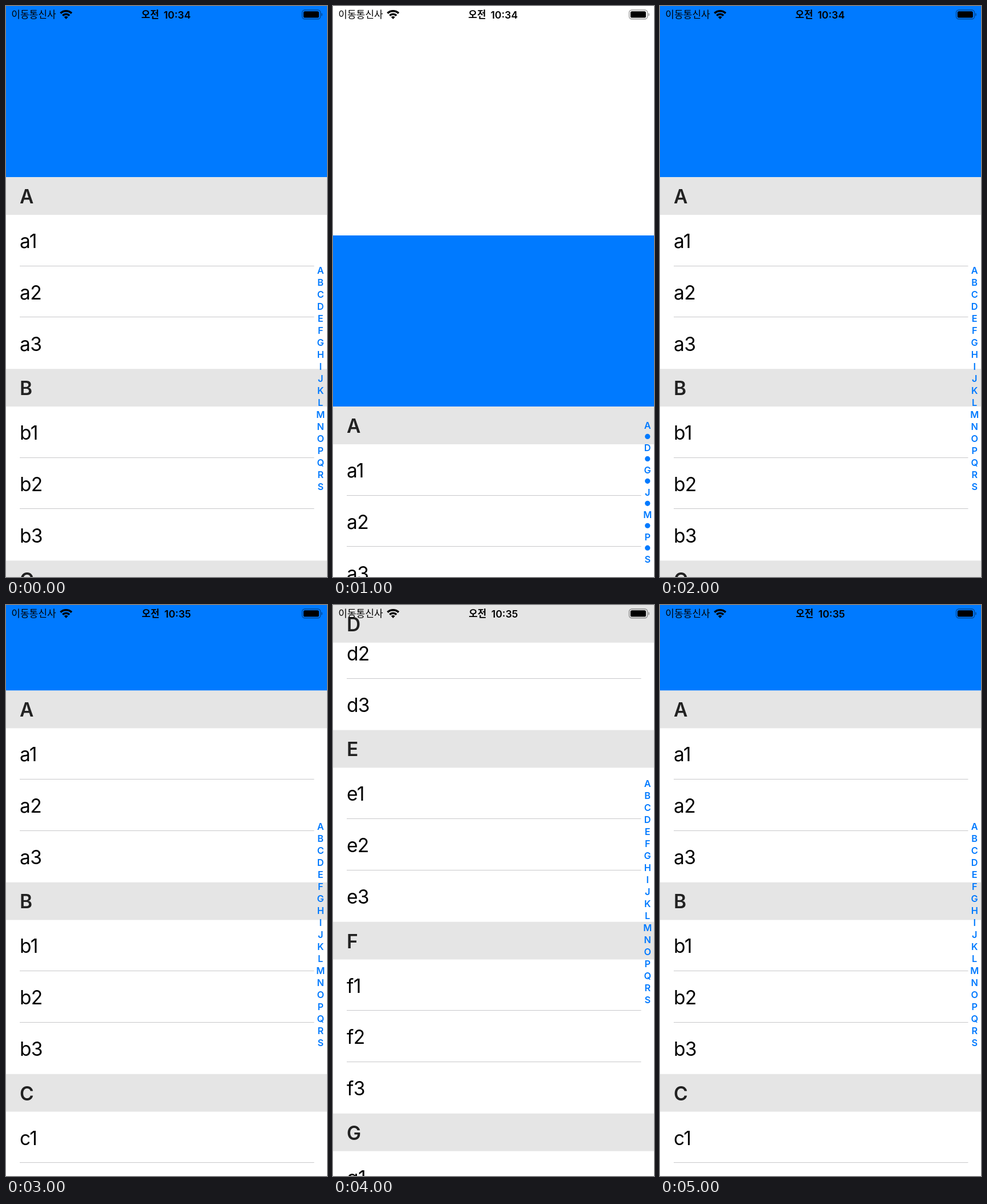
These frames come from a looping animation (561 by 998 pixels, 6000 ms). An HTML page with a canvas:

```html
<!DOCTYPE html>
<html lang="ko">
<head>
<meta charset="utf-8">
<title>Section index list</title>
<style>
  html, body { margin: 0; width: 100%; height: 100%; overflow: hidden; background: #fff; }
  canvas { display: block; }
</style>
</head>
<body>
<canvas id="stage" width="561" height="998"></canvas>
<script>
const ctx = document.getElementById('stage').getContext('2d');
const WIDTH = 561, HEIGHT = 998;
const BLUE = '#007aff';
const BANNER = 299.2, HEADER = 65.8, ROW = 89.76, SECTION = HEADER + 3 * ROW;
const LETTERS = [...'ABCDEFGHIJKLMNOPQRS'];
const LATIN = 'Inter, sans-serif';
const HANGUL = '"Noto Sans CJK KR", "Noto Sans CJK", sans-serif';
const STEP = 1000;

// listTop: top of section A; indexY: centre of the first index letter
const resting = { listTop: 299.2, indexY: 462, clock: '10:34' };
const halfway = { listTop: 149.6, indexY: 387, clock: '10:35' };
const poses = [
  resting,
  { listTop: 700.2, indexY: 733, clock: '10:34', compact: true },
  resting,
  halfway,
  { listTop: -1121.7, indexY: 312, clock: '10:35' },
  halfway
];

function rect(color, x, y, w, h) {
  ctx.fillStyle = color;
  ctx.fillRect(x, y, w, h);
}

function text(string, x, y, font, { color = '#000', align = 'left', spacing = 0 } = {}) {
  ctx.font = font;
  ctx.fillStyle = color;
  ctx.textAlign = align;
  ctx.letterSpacing = spacing + 'px';
  ctx.fillText(string, x, y);
}

function rounded(x, y, w, h, radius) {
  ctx.beginPath();
  ctx.roundRect(x, y, w, h, radius);
}

function drawHeader(letter, y) {
  rect('#e5e5e5', 0, y, WIDTH, HEADER);
  text(letter, 24, y + 45.8, `600 33.4px ${LATIN}`, { color: '#222' });
}

function drawList(listTop) {
  rect(BLUE, 0, listTop - BANNER, WIDTH, BANNER);
  let pinned;
  LETTERS.forEach((letter, i) => {
    const top = listTop + i * SECTION;
    if (top > HEIGHT || top + SECTION < 0) return;
    for (let n = 1; n <= 3; n++) {
      const y = top + HEADER + (n - 1) * ROW;
      text(letter.toLowerCase() + n, 24, y + 58, `400 33.4px ${LATIN}`, { spacing: -0.6 });
      if (n < 3) rect('#c8c8ca', 24, Math.floor(y + ROW - 0.6), 514.5, 1);
    }
    if (top < 0) pinned = letter;
    else drawHeader(letter, top);
  });
  if (pinned) drawHeader(pinned, 0);
}

function drawIndex(firstY, compact) {
  const font = `600 16.3px ${LATIN}`;
  const drawLetter = (letter, y) =>
    text(letter, 549.7, y + 6, font, { color: BLUE, align: 'center' });
  if (!compact) {
    LETTERS.forEach((letter, i) => drawLetter(letter, firstY + i * 21));
    return;
  }
  // Every third letter, with a dot between neighbours
  for (let i = 0; i < 13; i++) {
    const y = firstY + i * 19.47;
    if (i % 2 === 0) {
      drawLetter(LETTERS[i / 2 * 3], y);
    } else {
      ctx.beginPath();
      ctx.arc(549.7, y, 4.6, 0, Math.PI * 2);
      ctx.fillStyle = BLUE;
      ctx.fill();
    }
  }
}

function drawWifi(x, y) {
  const from = -Math.PI * 0.74, to = -Math.PI * 0.26;
  ctx.fillStyle = '#000';
  for (const [inner, outer] of [[0, 5], [6.9, 10.4], [12.5, 16]]) {
    ctx.beginPath();
    ctx.arc(x, y, outer, from, to);
    ctx.arc(x, y, inner, to, from, true);
    ctx.fill();
  }
}

function drawBattery() {
  ctx.strokeStyle = ctx.fillStyle = 'rgba(0,0,0,.4)';
  ctx.lineWidth = 1.4;
  rounded(517.6, 7, 32, 15.8, 4.5);
  ctx.stroke();
  rounded(551.2, 12.2, 1.6, 5.4, [0, 2, 2, 0]);
  ctx.fill();
  ctx.fillStyle = '#000';
  rounded(519.9, 9.3, 27, 11.2, 2.6);
  ctx.fill();
}

function drawStatusBar(clock) {
  text('이동통신사', 9.3, 21.2, `400 17px ${HANGUL}`);
  drawWifi(105, 23);
  const shift = clock === '10:35' ? 0.7 : 0;
  text('오전', 236.5 + shift, 21.2, `600 16.8px ${HANGUL}`);
  text(clock, 323 + shift / 2, 21.6, `600 17.6px ${LATIN}`, { align: 'right' });
  drawBattery();
}

function frame(now) {
  const pose = poses[Math.floor(now / STEP) % poses.length];
  rect('#fff', 0, 0, WIDTH, HEIGHT);
  drawList(pose.listTop);
  drawIndex(pose.indexY, pose.compact);
  drawStatusBar(pose.clock);
}

const start = performance.now();
function tick() {
  frame(performance.now() - start);
  requestAnimationFrame(tick);
}
tick();
</script>
</body>
</html>
```
